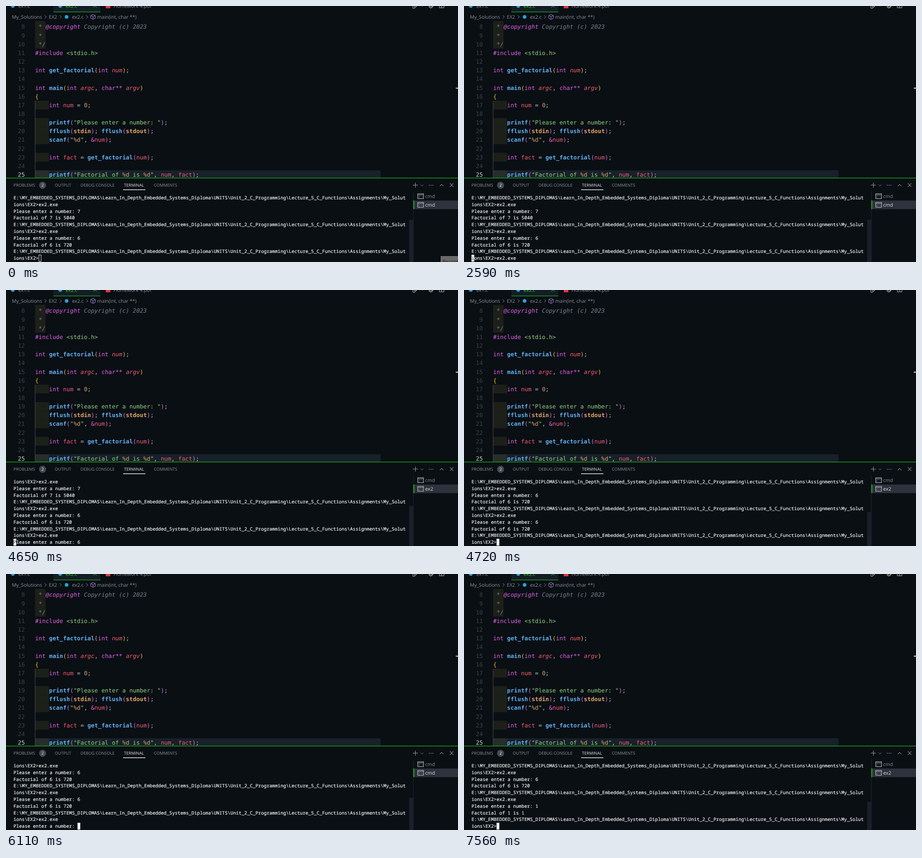
An HTML page for the animation above (8000 ms loop, 992x564 px).

```html
<!DOCTYPE html>
<html lang="en">
<head>
<meta charset="utf-8">
<title>Terminal session</title>
<style>
html, body { margin: 0; width: 100%; height: 100%; overflow: hidden; background: #0a0f14; }
svg { display: block; width: 992px; height: 564px; }
text { white-space: pre; text-rendering: geometricPrecision; }
.ui { font: 10.7px "Open Sans", sans-serif; fill: #8b9198; }
.tab { font: 9.15px "Open Sans", sans-serif; fill: #8d9399; }
.code { font: 12.73px "DejaVu Sans Mono", monospace; fill: #bbbfc6; }
.term { font: 10.18px "Noto Sans Mono", monospace; fill: #f4f4f4; stroke: #f4f4f4; stroke-width: .2px; }
.num { text-anchor: end; fill: #3b4249; }
.now { fill: #cdd1d6; }
.key { fill: #e062e5; }
.fn { fill: #61afef; font-weight: bold; }
.var { fill: #f25c72; }
.arg { fill: #f25c72; font-style: italic; }
.str { fill: #8fd07f; }
.lit { fill: #d8a066; }
.std { fill: #e0a366; font-weight: bold; }
.note { fill: #7a8089; font-style: italic; }
.doc { fill: #e062e5; font-style: italic; }
.b0 { fill: #f0c419; }
.b1 { fill: #da70d6; }
.line { fill: none; stroke: #c2c6ca; }
</style>
</head>
<body>
<svg viewBox="0 0 992 564">
  <!-- editor tabs -->
  <rect x="104" width="103" height="13" fill="#141d26"/>
  <circle cx="15" cy="0" r="4" fill="#2a9fd8"/>
  <text class="ui" x="27" y="3.5">ex1.c</text>
  <circle cx="119" cy="0" r="4" fill="#2a9fd8"/>
  <text class="ui" x="131" y="3.5" style="fill:#25d425">ex2.c</text>
  <path class="line" style="stroke:#25d425" d="M191.5 -4l7.5 7.5m0 -7.5l-7.5 7.5"/>
  <rect x="104" y="12.5" width="103" height="1.3" fill="#17a817"/>
  <rect x="219" y="-5" width="10" height="10" fill="#e0383e"/>
  <text class="ui" x="236" y="3.5" font-style="italic">Homework 4.pdf</text>
  <path class="line" d="M893 -2v7h4v-7M895 0h7l-4 4M911 -2l2.500 2.500l2.500 -2.500M951 -5h10v9h-10zM956 -5v9"/>
  <circle class="line" cx="932.5" cy="0" r="4" stroke-width="2" stroke-dasharray="2 1" style="stroke:#d6d2a4"/>
  <circle class="line" cx="932.5" cy="0" r="1.5"/>

  <!-- breadcrumb -->
  <g class="ui">
    <text x="13" y="27.8">My_Solutions</text>
    <text x="94" y="27.8">EX2</text>
    <text x="145" y="27.8">ex2.c</text>
    <text x="200" y="27.8">main(int, char **)</text>
  </g>
  <circle cx="133" cy="24" r="4" fill="#2a9fd8"/>
  <path class="line" style="stroke:#8b9198" d="M85 20.5l3.5 3.5l-3.5 3.5M118 20.5l3.5 3.5l-3.5 3.5M176 20.5l3.5 3.5l-3.5 3.5"/>
  <path class="line" style="stroke:#b180d7" d="M191 18.5l5 2.5v6l-5 2.5l-5 -2.5v-6zM186 21l5 2.5l5 -2.5M191 23.5v6"/>

  <!-- editor -->
  <rect x="64" y="362" width="758" height="17" fill="#18202a"/>
  <rect x="64" y="33" width="22.7" height="61" fill="#1d2019"/>
  <g id="code"></g>
  <rect x="63.5" y="209" width="1" height="170" fill="#4a4f52"/>
  <rect x="987" y="180" width="5" height="2" fill="#d4d4d4"/>

  <!-- panel -->
  <rect y="379" width="992" height="185" fill="#0a0f14"/>
  <rect y="378.3" width="992" height="1.4" fill="#12a812"/>
  <g class="tab">
    <text x="16.5" y="398.3">PROBLEMS</text>
    <text x="107" y="398.3">OUTPUT</text>
    <text x="163.5" y="398.3">DEBUG CONSOLE</text>
    <text x="259" y="398.3" style="fill:#e7e7e7">TERMINAL</text>
    <text x="324.5" y="398.3">COMMENTS</text>
    <circle cx="80.3" cy="395" r="7.7" fill="#454b52"/>
    <text x="80.3" y="398.3" text-anchor="middle" style="fill:#f2f2f2">2</text>
  </g>
  <rect x="257" y="404" width="49" height="1.5" fill="#e7e7e7"/>
  <path class="line" d="M952 397l4 -4l4 4M974 390.5l8 8m0 -8l-8 8"/>
  <path class="line" style="stroke:#9da2a7" d="M893 394.5h11M898.5 389v11"/>
  <path class="line" style="stroke:#868b90" d="M910 393.5l3 3l3 -3"/>
  <path class="line" style="stroke:#7f9cc0" stroke-width="1.5" d="M928 395h1.8m2.2 0h1.8m2.2 0h1.8"/>

  <!-- terminal list -->
  <rect x="893.5" y="409" width="1" height="155" fill="#222a32"/>
  <rect x="894" y="428.5" width="98" height="19" fill="#2d323c"/>
  <rect x="894" y="428.5" width="2" height="19" fill="#18b418"/>
  <g id="icons"></g>
  <text class="ui" x="920" y="422.5">cmd</text>
  <text class="ui" id="label" x="920" y="441.8" style="fill:#e0e0e0"></text>

  <!-- terminal -->
  <rect id="bar" x="885" width="8.5" fill="#18212b"/>
  <g id="rows"></g>
  <path id="link" d="M16.5 547.5H876M16.5 561.5H65" stroke="#f4f4f4"/>
  <rect id="cursor"/>
  <text class="term" id="under" y="559.2" style="fill:#30353a;stroke:none"></text>
  <g id="tip">
    <rect x="954.5" y="551.5" width="45" height="20" fill="#696969" stroke="#757575"/>
    <text class="ui" x="958" y="567" style="fill:#1c1c1c">Record</text>
  </g>
</svg>
<script>
const $ = id => document.getElementById(id);

function add(parent, tag, attrs, text) {
  const el = document.createElementNS("http://www.w3.org/2000/svg", tag);
  for (const k in attrs) el.setAttribute(k, attrs[k]);
  if (text) el.textContent = text;
  return parent.appendChild(el);
}

// Editor text
const source = ` * @copyright Copyright (c) 2023
 *
 */
#include <stdio.h>

int get_factorial(int num);

int main(int argc, char** argv)
{
    int num = 0;

    printf("Please enter a number: ");
    fflush(stdin); fflush(stdout);
    scanf("%d", &num);

    int fact = get_factorial(num);

    printf("Factorial of %d is %d", num, fact);`.split("\n");

const rules = [
  ["doc", /^@\w+/], ["key", /^(#include|int\b|char\b|[*&]+)/],
  ["str", /^(".*?"|<.*?>)/], ["std", /^(stdin|stdout)/],
  ["fn", /^\w+(?=\()/], ["lit", /^\d+/], ["var", /^[a-z]\w*/],
  ["open", /^[({]/], ["close", /^[)}]/], ["", /^(\s+|.)/]
];
let depth = 0;

function paint(line, el) {
  const span = (cls, s) => add(el, "tspan", { class: cls }, s);
  if (line.startsWith(" *")) {
    line.split(/(@\w+)/).forEach(s => s && span(s[0] === "@" ? "doc" : "note", s));
    return;
  }
  const signature = line.startsWith("int");
  while (line) {
    const [kind, re] = rules.find(r => r[1].test(line));
    const s = line.match(re)[0];
    line = line.slice(s.length);
    if (kind === "str") s.split(/(%d)/).forEach(p => p && span(p === "%d" ? "lit" : "str", p));
    else if (kind === "open") span("b" + depth++, s);
    else if (kind === "close") span("b" + --depth, s);
    else span(kind === "var" && signature ? "arg" : kind, s);
  }
}

source.forEach((line, i) => {
  const y = 50.4 + 19.16 * i, last = i === source.length - 1;
  if (line.startsWith("    "))
    add($("code"), "rect", { x: 64, y: y - 14.2, width: 30.3, height: 19.16, fill: last ? "#272d2b" : "#1d2019" });
  add($("code"), "text", { class: "code num" + (last ? " now" : ""), x: 41.3, y }, String(i + 8));
  paint(line, add($("code"), "text", { class: "code", x: 63.9, y }));
});

for (const y of [413.5, 432.5]) {
  add($("icons"), "path", { class: "line", d: `M903.5 ${y}h13v11h-13zM903.5 ${y + 2.5}h13` });
  add($("icons"), "text", { x: 905, y: y + 9.3, fill: "#c2c6ca", style: "font:6px 'Noto Sans Mono',monospace" }, "C:\\");
}

// Terminal session
const left = 16.5, advance = 6.108, pitch = 14.8;
const path = "E:\\MY_EMBEDDED_SYSTEMS_DIPLOMAS\\Learn_In_Depth_Embedded_Systems_Diploma\\UNITS\\Unit_2_C_Programming\\Lecture_5_C_Functions\\Assignments\\My_Solut";
const prompt = "ions\\EX2>", run = prompt + "ex2.exe", ask = "Please enter a number: ";
const log = [[7, 5040], [6, 720], [6, 720], [1, 1]]
  .flatMap(([n, f]) => [path, run, ask + n, `Factorial of ${n} is ${f}`])
  .concat(path, prompt);

// Each step lists only what changes; the caret follows the last row unless col is set
const steps = [
  { t: 0, top: 0, last: prompt, label: "cmd", bar: 471, hollow: true, tip: true, link: false },
  { t: 70, tip: false },
  { t: 460, link: true },
  { t: 860, hollow: false },
  { t: 990, link: false },
  { t: 1730, last: run },
  { t: 2590, col: 0 },
  { t: 2660, top: 1, last: "", bar: 476 },
  { t: 2920, last: ask },
  { t: 3730, label: "ex2" },
  { t: 4520, last: ask + 6 },
  { t: 4650, col: 0 },
  { t: 4720, top: 4, last: prompt, bar: 489 },
  { t: 5520, label: "cmd" },
  { t: 5580, last: run },
  { t: 6040, col: 0 },
  { t: 6110, top: 5, last: ask, bar: 493 },
  { t: 6900, label: "ex2" },
  { t: 7100, last: ask + 1 },
  { t: 7560, top: 8, last: prompt, bar: 502 }
];
const states = [];
for (const s of steps) states.push({ ...states.at(-1), col: undefined, ...s });

const rows = Array.from({ length: 10 }, (_, i) =>
  add($("rows"), "text", { class: "term", x: left, y: 426 + pitch * i }));
const set = (id, attrs) => { for (const k in attrs) $(id).setAttribute(k, attrs[k]); };
const show = (id, on) => { $(id).style.display = on ? "" : "none"; };

function draw(s) {
  rows.forEach((row, i) => { row.textContent = i < 9 ? log[s.top + i] : s.last; });
  const col = s.col ?? s.last.length, x = left + col * advance;
  set("cursor", s.hollow
    ? { x: x + .6, y: 548.5, width: 5, height: 14, fill: "none", stroke: "#e8e8e8" }
    : { x, y: 548, width: 6, height: 15, fill: "#fff", stroke: "none" });
  set("under", { x });
  $("under").textContent = s.last[col] || "";
  $("label").textContent = s.label;
  set("bar", { y: s.bar, height: 564 - s.bar });
  show("tip", s.tip);
  show("link", s.link);
}

let shown;
function tick() {
  const t = performance.now() % 8000;
  const state = states.findLast(s => s.t <= t);
  if (state !== shown) draw(shown = state);
  requestAnimationFrame(tick);
}
tick();
</script>
</body>
</html>
```
